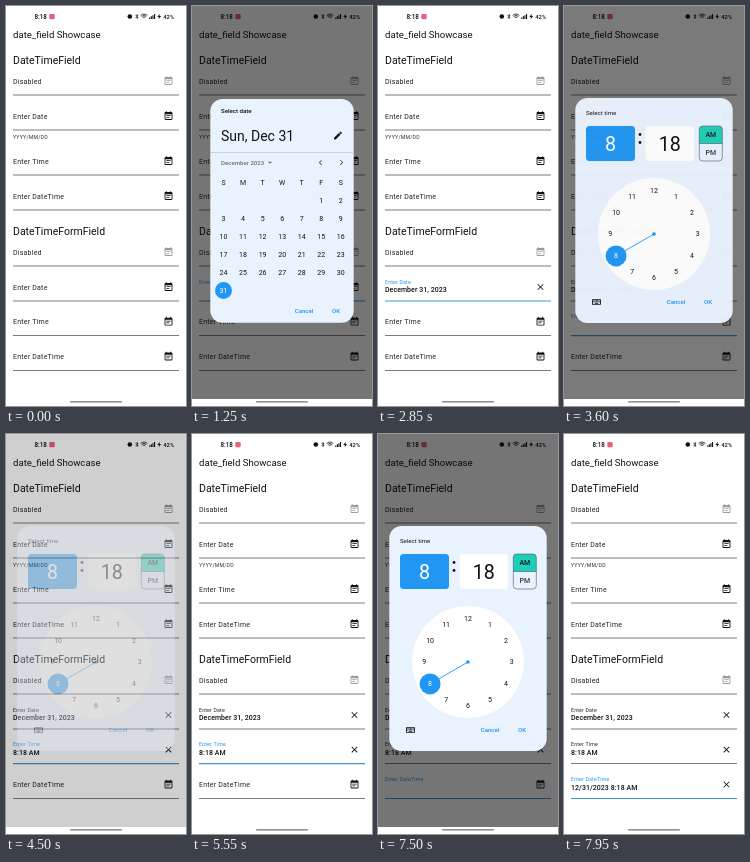
These frames come from a looping animation (180 px wide and 400 px high, 8000 ms). An HTML page with a canvas:

```html
<!DOCTYPE html>
<html lang="en">
<head>
<meta charset="utf-8">
<title>date_field Showcase</title>
<style>
html, body { margin: 0; width: 100%; height: 100%; overflow: hidden; background: #fff; }
canvas { display: block; width: 180px; height: 400px; }
</style>
</head>
<body>
<canvas id="stage"></canvas>
<script>
const W = 180, H = 400, LOOP = 8000;
const BLUE = '#2196f3', INK = '#111', SURFACE = '#e9f3fe';
const dpr = window.devicePixelRatio || 1;

const ICONS = {
  event: 'M17 10H7v2h10v-2zm2-7h-1V1h-2v2H8V1H6v2H5c-1.11 0-1.99.9-1.99 2L3 19c0 1.1.89 2 2 2h14c1.1 0 2-.9 2-2V5c0-1.1-.9-2-2-2zm0 16H5V8h14v11zm-5-5H7v2h7v-2z',
  close: 'M19 6.41 17.59 5 12 10.59 6.41 5 5 6.41 10.59 12 5 17.59 6.41 19 12 13.41 17.59 19 19 17.59 13.41 12z',
  edit: 'M3 17.25V21h3.75L17.81 9.94l-3.75-3.75zM20.71 7.04c.39-.39.39-1.02 0-1.41l-2.34-2.34c-.39-.39-1.02-.39-1.41 0l-1.83 1.83 3.75 3.75z',
  left: 'M15.41 7.41 14 6l-6 6 6 6 1.41-1.41L10.83 12z',
  right: 'M10 6 8.59 7.41 13.17 12l-4.58 4.59L10 18l6-6z',
  drop: 'M7 10l5 5 5-5z',
  keys: 'M20 7v10H4V7h16m0-2H4c-1.1 0-2 .9-2 2v10c0 1.1.9 2 2 2h16c1.1 0 2-.9 2-2V7c0-1.1-.9-2-2-2zM11 8h2v2h-2zm0 3h2v2h-2zM8 8h2v2H8zm0 3h2v2H8zM5 11h2v2H5zm0-3h2v2H5zM8 14h8v2H8zM14 11h2v2h-2zm0-3h2v2h-2zM17 11h2v2h-2zm0-3h2v2h-2z',
  wireless: 'M17.7 7.7 12 2h-1v7.6L6.4 5 5 6.4 10.6 12 5 17.6 6.4 19l4.6-4.6V22h1l5.7-5.7-4.3-4.3zM13 5.8l1.9 1.9L13 9.6zm1.9 10.5L13 18.2v-3.8z',
  bolt: 'M14 2 5 14h6l-1 8 9-12h-6z'
};
for (const k in ICONS) ICONS[k] = new Path2D(ICONS[k]);

function makeLayer(canvas) {
  canvas.width = W * dpr;
  canvas.height = H * dpr;
  const g = canvas.getContext('2d');
  g.scale(dpr, dpr);
  return g;
}

// y is the vertical middle of the capitals
function text(g, s, x, y, size, { color = INK, weight = 400, gap = 0, align = 'left' } = {}) {
  g.font = `${weight} ${size}px Roboto, sans-serif`;
  g.letterSpacing = gap + 'px';
  g.textAlign = align;
  g.fillStyle = color;
  g.fillText(s, x, y + size * 0.356);
}

function centred(g, s, x, y, size, color, weight) {
  text(g, s, x, y, size, { color, weight, align: 'center' });
}

function icon(g, name, x, y, color = INK, size = 10.5) {
  g.save();
  g.translate(x - size / 2, y - size / 2);
  g.scale(size / 24, size / 24);
  g.fillStyle = color;
  g.fill(ICONS[name], 'evenodd');
  g.restore();
}

function box(g, x, y, w, h, r, fill) {
  g.beginPath();
  g.roundRect(x, y, w, h, r);
  g.fillStyle = fill;
  g.fill();
}

function disc(g, x, y, r, fill) {
  g.beginPath();
  g.arc(x, y, r, 0, 7);
  g.fillStyle = fill;
  g.fill();
}

function actions(g, y) {
  centred(g, 'Cancel', 112, y, 6.1, BLUE, 500);
  centred(g, 'OK', 144, y, 6.1, BLUE, 500);
}

function dateDialog(g) {
  box(g, 18.3, 93, 143.4, 223.8, 12.2, SURFACE);
  text(g, 'Select date', 29, 104.5, 6.1, { weight: 500 });
  text(g, 'Sun, Dec 31', 29, 130, 14);
  icon(g, 'edit', 146, 129.5);
  box(g, 18.3, 146, 143.4, 0.5, 0, '#aab4be');
  text(g, 'December 2023', 29, 157, 6.1, { color: '#6b7076', weight: 500 });
  icon(g, 'drop', 78, 156.5, '#6b7076');
  icon(g, 'left', 128.5, 156.5, '#555');
  icon(g, 'right', 149.5, 156.5, '#555');
  const col = i => 31.5 + 19.55 * i;
  [...'SMTWTFS'].forEach((d, i) => centred(g, d, col(i), 177, 7));
  for (let d = 1; d <= 31; d++) {
    const cell = d + 4;
    const x = col(cell % 7), y = 195 + 17.9 * Math.floor(cell / 7);
    if (d === 31) disc(g, x, y, 8.5, BLUE);
    centred(g, d, x, y, 7, d === 31 ? '#fff' : INK);
  }
  actions(g, 304.5);
}

function timeDialog(g) {
  box(g, 11.3, 92, 157.4, 225, 12.2, SURFACE);
  text(g, 'Select time', 22, 107, 6.1);
  box(g, 22, 120, 49, 35, 3.5, BLUE);
  centred(g, '8', 46.5, 137.5, 19.7, '#fff');
  disc(g, 76, 128.5, 1.4, INK);
  disc(g, 76, 136.5, 1.4, INK);
  box(g, 81.5, 120, 48.5, 35, 3.5, '#fff');
  centred(g, '18', 105.7, 137.5, 19.7);

  box(g, 135.3, 120, 23, 17.5, [3.5, 3.5, 0, 0], '#1dcfb8');
  g.strokeStyle = '#4a5560';
  g.lineWidth = 0.6;
  g.beginPath();
  g.roundRect(135.3, 120, 23, 35, 3.5);
  g.moveTo(135.3, 137.5);
  g.lineTo(158.3, 137.5);
  g.stroke();
  centred(g, 'AM', 146.8, 128.7, 7, INK, 500);
  centred(g, 'PM', 146.8, 146.3, 7, '#333', 500);

  const cx = 90, cy = 228;
  const at = h => [cx + 43.8 * Math.sin(h * Math.PI / 6), cy - 43.8 * Math.cos(h * Math.PI / 6)];
  disc(g, cx, cy, 56, '#fff');
  disc(g, cx, cy, 1.8, BLUE);
  disc(g, ...at(8), 10.5, BLUE);
  g.strokeStyle = BLUE;
  g.lineWidth = 0.9;
  g.beginPath();
  g.moveTo(cx, cy);
  g.lineTo(...at(8));
  g.stroke();
  for (let h = 1; h <= 12; h++) centred(g, h, ...at(h), 7, h === 8 ? '#fff' : INK);

  icon(g, 'keys', 32.5, 296);
  actions(g, 296);
}

function prerender(draw) {
  const canvas = document.createElement('canvas');
  draw(makeLayer(canvas));
  return canvas;
}

const g = makeLayer(document.getElementById('stage'));
const dateLayer = prerender(dateDialog);
const timeLayer = prerender(timeDialog);

const ramp = (t, a, b) => {
  const p = Math.min(1, Math.max(0, (t - a) / (b - a)));
  return p * p * (3 - 2 * p);
};
const mix = (a, b, p) => a + (b - a) * p;

const dialogs = [
  { layer: dateLayer, open: 680, shut: 2100 },
  { layer: timeLayer, open: 3380, shut: 4350 },
  { layer: dateLayer, open: 5760, shut: 6720 },
  { layer: timeLayer, open: 6790, shut: 7610 }
];

const FADE = 250;
// focus: label floats; filled: value appears; blur: next field takes over
const fields = [
  { label: 'Disabled', y: 75, off: true },
  { label: 'Enter Date', y: 110, hint: 'YYYY/MM/DD' },
  { label: 'Enter Time', y: 155 },
  { label: 'Enter DateTime', y: 190 },
  { label: 'Disabled', y: 246, off: true },
  { label: 'Enter Date', y: 281, focus: 680, filled: 2100, blur: 3380, value: 'December 31, 2023' },
  { label: 'Enter Time', y: 315.6, focus: 3380, filled: 4350, blur: 5760, value: '8:18 AM' },
  { label: 'Enter DateTime', y: 350.5, focus: 5760, filled: 7610, blur: LOOP, value: '12/31/2023 8:18 AM' }
];

function drawField(f, t) {
  const up = f.focus ? ramp(t, f.focus, f.focus + 200) : 0;
  const active = f.focus && t >= f.focus && t < f.blur;
  const full = f.value && t >= f.filled;
  text(g, f.label, 7, f.y + 0.2 - 5.5 * up, mix(7, 5.24, up), {
    color: active ? BLUE : '#222', gap: mix(0.22, 0.17, up)
  });
  if (full) text(g, f.value, 7, f.y + 2.9, 7, { weight: 500, gap: 0.05 });
  icon(g, full ? 'close' : 'event', 162.5, f.y, f.off ? '#9b9b9b' : INK);
  box(g, 7, f.y + 13.4, 166, active ? 1.2 : 1, 0, active ? '#4294cf' : '#7c7c7c');
  if (f.hint) text(g, f.hint, 7, f.y + 21, 5.24, { color: '#333', gap: 0.17 });
}

function statusBar() {
  text(g, '8:18', 28.5, 10.6, 6.3, { weight: 500 });
  box(g, 43.3, 7.9, 5.4, 5.4, 1.2, '#e8607a');
  disc(g, 123.8, 10.5, 2.3, INK);
  icon(g, 'wireless', 131, 10.5, INK, 6);
  g.strokeStyle = INK;
  g.lineWidth = 0.8;
  for (const r of [1.8, 3.3, 4.8]) {
    g.beginPath();
    g.arc(138, 12.9, r, -2.35, -0.8);
    g.stroke();
  }
  for (let i = 0; i < 4; i++) box(g, 143.2 + i * 1.6, 11.4 - i * 1.1, 1.1, 1.6 + i * 1.1, 0, INK);
  icon(g, 'bolt', 153.2, 10.5, INK, 6.5);
  text(g, '42%', 157.3, 10.6, 5.8, { weight: 500 });
}

function draw(t) {
  g.globalAlpha = 1;
  g.fillStyle = '#fff';
  g.fillRect(0, 0, W, H);
  statusBar();
  text(g, 'date_field Showcase', 7, 28.3, 9.6);
  text(g, 'DateTimeField', 7, 54.6, 10.5);
  text(g, 'DateTimeFormField', 7, 225.2, 10.5);
  for (const f of fields) drawField(f, t);

  for (const d of dialogs) {
    const a = ramp(t, d.open, d.open + FADE) * (1 - ramp(t, d.shut, d.shut + FADE));
    if (!a) continue;
    g.globalAlpha = a;
    g.fillStyle = 'rgba(0,0,0,.54)';
    g.fillRect(0, 0, W, 393);
    g.drawImage(d.layer, 0, 0, W, H);
  }
  g.globalAlpha = 1;
  box(g, 64, 395.2, 52, 1.2, 0.6, '#707070');
}

const start = performance.now();
function tick() {
  draw((performance.now() - start) % LOOP);
  requestAnimationFrame(tick);
}
tick();
</script>
</body>
</html>
```
